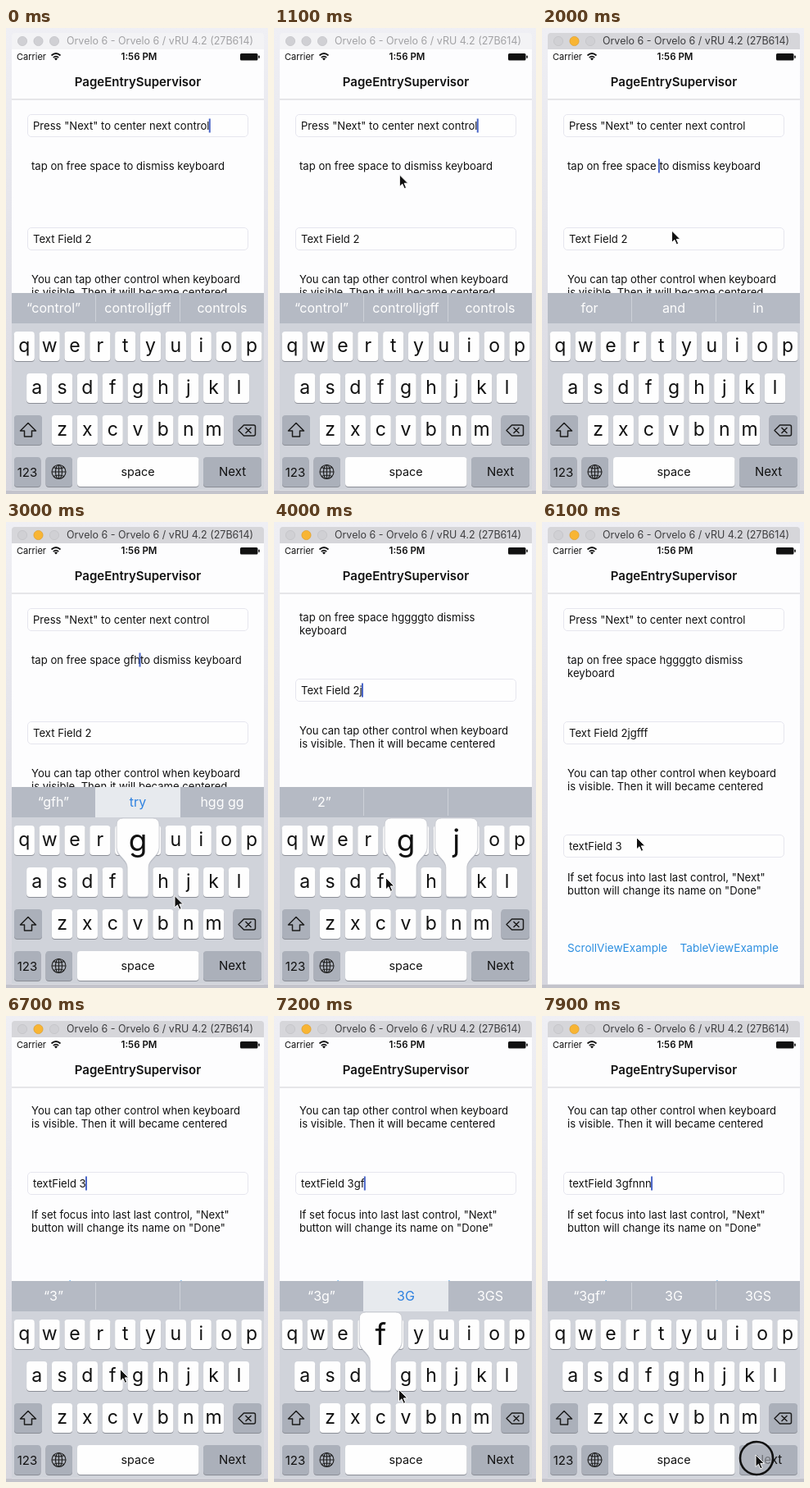
Recreate the animation shown at these times as an HTML page. Size 320 px wide and 568 px high, loop 8000 ms.

```html
<!DOCTYPE html>
<html lang="en">
<head>
<meta charset="utf-8">
<title>Form entry demo</title>
<style>
html, body { margin: 0; width: 100%; height: 100%; overflow: hidden; background: #e4e4ec; }
svg { display: block; width: 320px; height: 568px; font-family: Inter, Roboto, sans-serif; }
text { white-space: pre; fill: #111; }
.body { font-size: 13.1px; }
.link { font-size: 13.6px; fill: #2d8fe0; }
.mid { text-anchor: middle; }
.field { fill: #fefefe; stroke: #e6e6ee; }
.icon { fill: none; stroke: #1c1c1c; stroke-width: 1.5; stroke-linejoin: round; }
</style>
</head>
<body>
<svg id="stage" viewBox="0 0 320 568"></svg>
<script>
const LOOP = 8000, STEP = 100;
const BODY_FONT = '13.1px Inter, Roboto, sans-serif';
const stage = document.getElementById('stage');
const pen = document.createElement('canvas').getContext('2d');

// Each step track holds [start time, value]; the value stays until the next start.
const fields = [
  { y: 119, x: 33, text: [[0, 'Press "Next" to center next control']] },
  { y: 257, x: 33, text: [[0, 'Text Field 2'], [3900, 'Text Field 2j'], [4100, 'Text Field 2jg'],
    [4300, 'Text Field 2jgf'], [4500, 'Text Field 2jgff'], [4600, 'Text Field 2jgfff']] },
  { y: 395, x: 33, text: [[0, 'textField 3'], [6900, 'textField 3g'], [7200, 'textField 3gf'],
    [7400, 'textField 3gfn'], [7500, 'textField 3gfnn'], [7700, 'textField 3gfnnn']] }
];
const insertedWord = [[0, ''], [2500, 'g'], [2700, 'gf'], [2900, 'gfh'], [3100, 'gfhg'],
  [3200, 'gfhgg'], [3400, 'hgggg']];
const focus = [[0, 'field0'], [1400, 'note'], [3400, 'field1'], [5200, ''], [6300, 'field2']];
const pressed = [[0, ''], [2400, 'g'], [2500, ''], [2600, 'f'], [2700, ''], [2800, 'h'], [2900, 'g'],
  [3200, ''], [3800, 'j'], [4000, 'gj'], [4100, 'g'], [4200, 'f'], [4700, ''], [6800, 'g'],
  [7000, ''], [7100, 'f'], [7300, 'n'], [7700, '']];
const hints = [
  [0, ['“control”', 'controlljgff', 'controls']], [1400, ['for', 'and', 'in']],
  [2500, ['“g”', 'go', 'get']], [2700, ['“gf”', 'of', 'go']],
  [2900, ['“gfh”', 'try', 'hgg gg', true]], [3200, ['“gfhgg”', 'hgggg', 'hgg gg', true]],
  [3400, ['', '', '']], [3600, ['“2”', '', '']], [4100, ['“2j”', '', '']],
  [4400, ['“2jgf”', '', '']], [6300, ['“3”', '', '']],
  [6900, ['“3g”', '3G', '3GS', true]], [7300, ['“3gf”', '3G', '3GS']]
];
const clicks = [[0, false], [1300, true], [1500, false], [3300, true], [3500, false],
  [5100, true], [5300, false], [6200, true], [6400, false], [7800, true]];

// Motion tracks hold [time, ...values], eased between the stops.
const scroll = [[3400, 0], [3700, 52], [5200, 52], [5500, 0], [6300, 0], [6600, 191]];
const keyboardDrop = [[5200, 0], [5500, 246], [6300, 246], [6600, 0]];
const pointer = [[500, 330, 330], [1200, 143, 170], [1500, 143, 170], [2000, 158.5, 247],
  [2500, 206, 455.5], [3000, 206, 455.5], [3300, 261, 535], [3500, 261, 535], [4000, 136.5, 433.5],
  [4500, 136.5, 433.5], [5000, 205, 160], [5300, 205, 160], [6000, 115.5, 384.5], [6400, 115.5, 384.5],
  [6900, 152.5, 455.5], [7300, 152.5, 455.5], [7800, 261, 535]];

function held(track, t) {
  let value = track[0][1];
  for (const [start, next] of track) if (t >= start) value = next;
  return value;
}

function eased(track, t) {
  const i = track.findIndex(stop => stop[0] > t);
  if (i === 0) return track[0].slice(1);
  if (i < 0) return track[track.length - 1].slice(1);
  const a = track[i - 1], b = track[i];
  const p = (t - a[0]) / (b[0] - a[0]), e = p * p * (3 - 2 * p);
  return a.slice(1).map((v, k) => v + (b[k + 1] - v) * e);
}

const rect = (x, y, w, h, fill, r = 0, extra = '') =>
  `<rect x="${x}" y="${y}" width="${w}" height="${h}" rx="${r}" fill="${fill}" ${extra}/>`;
const text = (x, y, value, extra = '') => `<text x="${x}" y="${y}" ${extra}>${value}</text>`;
const path = (d, extra = '') => `<path d="${d}" ${extra}/>`;
const keycap = (x, y, w, fill) => rect(x, y + 1, w, 36, '#8b8e96', 4) + rect(x, y, w, 36, fill, 4);

const PITCH = 30.85, LIGHT = '#fefefe', DARK = '#abb0ba', PAGE = '#fdfdfe';
const keys = {};
[['qwertyuiop', 22.3, 370], ['asdfghjkl', 37.7, 421], ['zxcvbnm', 68.5, 472]].forEach(([letters, x, y]) =>
  [...letters].forEach((letter, i) => keys[letter] = { x: x + i * PITCH, y }));

const letterKeys = Object.entries(keys).map(([letter, { x, y }]) =>
  keycap(x - 12.6, y, 25.2, LIGHT) + text(x, y + 25, letter, 'class="mid" font-size="23"')).join('');

function balloon(letter) {
  const { x, y } = keys[letter];
  const shape = `M${x - 26} ${y - 52}q0-8 8-8h36q8 0 8 8v28c0 10-13 14-13 24v32q0 4-4 4h-18q-4 0-4-4v-32c0-10-13-14-13-24z`;
  return path(shape, 'fill="#9a9ea8" fill-opacity=".6" transform="translate(0 1.5)"') +
    path(shape, `fill="${LIGHT}" stroke="#c2c5cc" stroke-width=".8"`) +
    text(x, y - 20, letter, 'class="mid" font-size="37"');
}

const keyboard = `
  ${rect(7, 323, 308, 241, '#d0d3da')}
  ${rect(7, 323, 308, 37, '#b5bac4')}
  <g id="hints"></g>
  ${letterKeys}
  ${keycap(10, 472, 34, DARK)}${keycap(277.5, 472, 34.5, DARK)}
  ${keycap(10, 523, 32.5, DARK)}${keycap(48.5, 523, 32.5, DARK)}
  ${keycap(87, 523, 148.5, LIGHT)}${keycap(241, 523, 71, DARK)}
  ${path('M27 481.5l9.5 9.5h-5v7h-9v-7h-5z', 'class="icon"')}
  ${path('M284 490.5l6.5-6.5h12q2 0 2 2v9q0 2-2 2h-12zM292.5 487l7 7m0-7l-7 7', 'class="icon"')}
  <g class="icon" style="stroke-width:1.1"><circle cx="64.5" cy="541" r="8.5"/><ellipse cx="64.5" cy="541" rx="4" ry="8.5"/>
  <path d="M56 541h17M64.5 532.5v17M58 535.5q6.5 3 13 0M58 546.5q6.5-3 13 0"/></g>
  ${text(26, 547, '123', 'class="mid" font-size="15"')}
  ${text(161, 546, 'space', 'class="mid" font-size="14.4"')}
  ${text(276.5, 546, 'Next', 'class="mid" font-size="15"')}
  <g id="balloons"></g>`;

const content = fields.map((f, i) =>
  `<rect class="field" x="26.5" y="${f.y - 13.5}" width="269" height="27" rx="4.5"/>` +
  text(f.x, f.y + 4.5, '', `class="body" id="field${i}"`)).join('') + `
  ${text(31, 172.5, '', 'class="body" id="noteTop"')}
  ${text(31, 188.5, '', 'class="body" id="noteEnd"')}
  ${text(31, 311, 'You can tap other control when keyboard', 'class="body"')}
  ${text(31, 327, 'is visible. Then it will became centered', 'class="body"')}
  ${text(31, 437.5, 'If set focus into last last control, "Next"', 'class="body"')}
  ${text(31, 453.5, 'button will change its name on "Done"', 'class="body"')}
  ${text(31, 523.5, 'ScrollViewExample', 'class="link"')}
  ${text(168.5, 523.5, 'TableViewExample', 'class="link"')}
  ${rect(0, 0, 2, 17, '#4a66c8', 0, 'id="caret"')}`;

stage.innerHTML = `
  <defs>
    <clipPath id="screen"><rect x="7" y="26" width="308" height="537.5"/></clipPath>
    <linearGradient id="backdrop" x2="0" y2="1"><stop stop-color="#efeff4"/><stop offset="1" stop-color="#d6d6de"/></linearGradient>
  </defs>
  ${rect(0, 0, 320, 568, 'url(#backdrop)')}
  ${rect(0, 564, 320, 4, '#c3c3cb')}
  ${rect(7, 6, 308, 24, '', 4, 'id="titleBar"')}
  <circle cx="20" cy="16" r="5.6" fill="#d0d0d4" stroke="#c0c0c4" stroke-width=".7"/>
  <circle id="amber" cx="39.5" cy="16" r="5.6" stroke-width=".7"/>
  <circle cx="59" cy="16" r="5.6" fill="#d0d0d4" stroke="#c0c0c4" stroke-width=".7"/>
  ${text(188, 20, 'Orvelo 6 - Orvelo 6 / vRU 4.2 (27B614)', 'id="windowTitle" class="mid" font-size="12.5"')}
  <g clip-path="url(#screen)">
    ${rect(7, 26, 308, 538, PAGE)}
    <g id="content">${content}</g>
    ${rect(7, 26, 308, 61, PAGE)}
    ${rect(7, 86.5, 308, 1, '#cfcfd6')}
    ${text(13, 39, 'Carrier', 'font-size="11"')}
    <g fill="none" stroke="#111" stroke-width="1.7">
      ${path('M55.5 33.5q5.5-5 11 0M57.8 36q3.2-2.8 6.4 0')}</g>
    ${path('M59 37.3q2-1.5 4 0l-2 2.2z')}
    ${text(162.5, 39, '1:56 PM', 'class="mid" font-size="11.5" font-weight="600"')}
    ${rect(286, 31, 21.5, 8.5, '#111', 1.5)}${rect(308.3, 33.5, 1.5, 3.5, '#111', 0.7)}
    ${text(161, 71, 'PageEntrySupervisor', 'class="mid" font-size="15" font-weight="600"')}
    <g id="keyboard">${keyboard}</g>
  </g>
  <g id="pointer">
    <circle id="touch" cx="1" cy="4" r="20" fill="#b2b6be" fill-opacity=".6" stroke="#111" stroke-width="2.6"/>
    ${path('M0 0v14.5l3.4-3.2 2.4 5.5 2.4-1-2.4-5.4h4.6z', 'fill="#111" stroke="#fefefe" stroke-width="1"')}
  </g>`;

const el = id => document.getElementById(id);
const set = (id, attrs) => Object.entries(attrs).forEach(([k, v]) => el(id).setAttribute(k, v));
const show = (id, on) => el(id).style.display = on ? '' : 'none';
const widthOf = value => { pen.font = BODY_FONT; return pen.measureText(value).width; };

function drawHints([left, middle, right, marked]) {
  const label = (x, value, fill = '#fefefe') =>
    text(x, 346.5, value, `class="mid" font-size="16" style="fill:${fill}"`);
  el('hints').innerHTML =
    (marked ? rect(109, 323, 104, 37, '#e7eaee')
            : rect(109, 325, 1, 33, '#cdd1d8') + rect(212, 325, 1, 33, '#cdd1d8')) +
    label(58, left) + label(161, middle, marked ? '#2f82e0' : undefined) + label(264, right);
}

function drawCaret(t, target, note) {
  show('caret', target && !(t < 2300 && t % 1000 >= 500));
  if (target === 'note') return set('caret', { x: 29.5 + widthOf(note), y: 159.5 });
  const field = fields[target.slice(-1)];
  if (field) set('caret', { x: field.x + widthOf(held(field.text, t)) - 0.7, y: field.y - 8.5 });
}

function render(t) {
  const active = t >= 1300;
  set('titleBar', { fill: active ? '#d6d6da' : '#f3f3f5' });
  set('amber', active ? { fill: '#f8b534', stroke: '#dd9d2c' } : { fill: '#d0d0d4', stroke: '#c0c0c4' });
  el('windowTitle').style.fill = active ? '#3e3e40' : '#a2a2a5';

  fields.forEach((f, i) => el('field' + i).textContent = held(f.text, t));
  const word = held(insertedWord, t), note = 'tap on free space ' + word;
  const wraps = word.length > 3;
  el('noteTop').textContent = note + 'to dismiss' + (wraps ? '' : ' keyboard');
  el('noteEnd').textContent = wraps ? 'keyboard' : '';
  drawCaret(t, held(focus, t), note);

  set('content', { transform: `translate(0 ${-eased(scroll, t)[0]})` });
  set('keyboard', { transform: `translate(0 ${eased(keyboardDrop, t)[0]})` });
  drawHints(held(hints, t));
  el('balloons').innerHTML = [...held(pressed, t)].map(balloon).join('');

  show('pointer', t >= 500);
  show('touch', held(clicks, t));
  set('pointer', { transform: `translate(${eased(pointer, t).join(' ')})` });
}

const started = performance.now();
function tick() {
  const t = Math.max(0, performance.now() - started) % LOOP;
  render(Math.floor(t / STEP) * STEP);
  requestAnimationFrame(tick);
}
tick();
</script>
</body>
</html>
```
